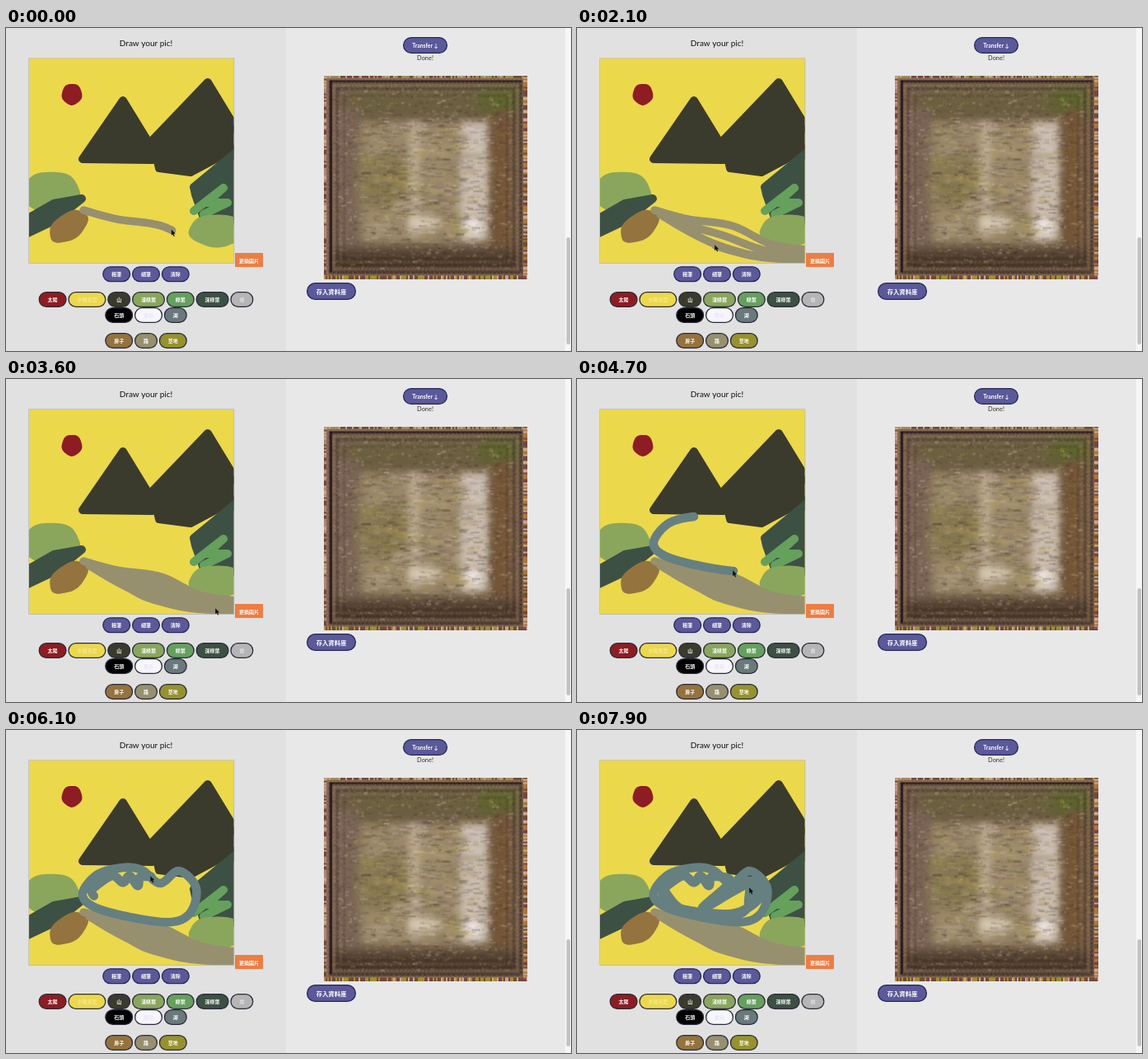
These frames come from a looping animation (686x392 px, 8 s). An HTML page with a canvas:

```html
<!DOCTYPE html>
<html lang="zh-Hant">
<head>
<meta charset="utf-8">
<title>Draw your pic!</title>
<style>
html, body { margin: 0; width: 100%; height: 100%; overflow: hidden; background: #e1e1e2; }
canvas { display: block; width: 686px; height: 392px; }
</style>
</head>
<body>
<canvas id="stage"></canvas>
<script>
const W = 686, H = 392, LOOP = 8000, STEP = 100;
const ratio = window.devicePixelRatio || 1;
const CJK = '"Noto Sans CJK TC", "Noto Sans CJK", sans-serif';
const LATIN = 'Lato, "Open Sans", sans-serif';
const C = {
  sky: '#ecd84b', sun: '#8e1c23', hill: '#3a3b2d', light: '#8aa65d', leaf: '#65a05d',
  dark: '#3d5044', house: '#94733f', road: '#97906f', lake: '#667f80', grass: '#97922f',
  pen: '#5b5999', navy: '#26265c', rim: '#2b2b3a'
};

function setup(canvas, w, h) {
  canvas.width = w * ratio;
  canvas.height = h * ratio;
  const g = canvas.getContext('2d');
  g.scale(ratio, ratio);
  return g;
}

function seeded(seed) {
  return () => (seed = (seed * 1664525 + 1013904223) >>> 0) / 4294967296;
}

// ---- interface ----
function label(g, text, x, y, font, color) {
  g.font = font;
  g.fillStyle = color;
  g.textAlign = 'center';
  g.textBaseline = 'middle';
  g.fillText(text, x, y);
}

function pill(g, cx, cy, w, h, text, fill, rim, font, ink = '#fff') {
  g.beginPath();
  g.roundRect(cx - w / 2 + .6, cy - h / 2 + .6, w - 1.2, h - 1.2, h / 2);
  g.fillStyle = fill;
  g.fill();
  g.lineWidth = 1.3;
  g.strokeStyle = rim;
  g.stroke();
  label(g, text, cx, cy + .5, font, ink);
}

// A centred row of buttons, each as wide as its text plus padding
function buttonRow(g, cy, rim, items) {
  const gap = 1.8, width = text => 22 + 6 * text.length;
  let x = 170 - items.reduce((sum, [text]) => sum + width(text) + gap, -gap) / 2;
  for (const [text, fill, ink] of items) {
    const w = width(text);
    pill(g, x + w / 2, cy, w, 19, text, fill, rim, `bold 6px ${CJK}`, ink);
    x += w + gap;
  }
}

function drawPage(g) {
  const box = (x, y, w, h, color) => { g.fillStyle = color; g.fillRect(x, y, w, h); };
  box(0, 0, 340, H, '#e1e1e2');
  box(340, 0, 339, H, '#e8e8e8');
  box(679, 0, 7, H, '#f6f6f6');
  g.fillStyle = '#c2c2c2';
  g.beginPath();
  g.roundRect(680.5, 254, 4.5, 130, 2.2);
  g.fill();

  label(g, 'Draw your pic!', 170, 19, `10px ${LATIN}`, '#111');
  label(g, 'Done!', 509, 36.5, `7.4px ${LATIN}`, '#333');
  pill(g, 509, 21, 54, 20, 'Transfer ↓', C.pen, C.navy, `bold 6.8px ${LATIN}`);
  pill(g, 395, 319.5, 60, 21, '存入資料庫', C.pen, C.navy, `bold 7.3px ${CJK}`);
  box(278, 273, 34, 17, '#ee7d43');
  label(g, '更換圖片', 295, 283, `bold 6px ${CJK}`, '#fff');

  buttonRow(g, 298.7, C.navy, [['粗筆', C.pen], ['細筆', C.pen], ['清除', C.pen]]);
  buttonRow(g, 329.5, C.rim, [
    ['太陽', C.sun], ['夕陽天空', C.sky, '#f4e99c'], ['山', C.hill], ['淺綠葉', C.light],
    ['綠葉', C.leaf], ['深綠葉', C.dark], ['霧', '#b5b5b5', '#dedede']
  ]);
  buttonRow(g, 348.5, C.rim, [['石頭', '#000'], ['雲朵', '#f7f5fd', '#e8e6f0'], ['湖', '#6a797c']]);
  buttonRow(g, 379.5, C.rim, [['房子', C.house], ['路', C.road], ['草地', C.grass]]);
}

// ---- generated picture on the right ----
function drawTexture(g) {
  const S = 247, art = document.createElement('canvas'), a = setup(art, S, S);
  const rnd = seeded(71);
  const pick = list => list[Math.floor(rnd() * list.length)];
  const patch = (x, y, w, h, color, blur = 6) => {
    a.filter = `blur(${blur * ratio}px)`;
    a.fillStyle = color;
    a.fillRect(x, y, w, h);
    a.filter = 'none';
  };

  a.fillStyle = '#6f5a48';
  a.fillRect(0, 0, S, S);
  patch(30, 14, 205, 36, '#6b6040', 8);
  patch(190, 16, 44, 26, '#5c642c', 8);
  patch(14, 40, 30, 170, '#7a6456');
  patch(44, 56, 156, 148, '#9c8a6c');
  patch(46, 96, 56, 64, '#877950', 9);
  patch(103, 56, 14, 140, '#b8a890', 4);
  patch(166, 57, 34, 142, '#cabdb2', 4);
  patch(172, 172, 18, 22, '#ece4e0', 5);
  patch(104, 172, 34, 14, '#d8ccb8', 5);
  patch(204, 44, 24, 165, '#745637');
  patch(12, 213, 224, 24, '#4c3a2b');

  // cloudy blotches, then horizontal brush-like streaks
  for (let i = 0; i < 90; i++) {
    a.globalAlpha = .25;
    patch(44 + rnd() * 145, 54 + rnd() * 140, 8 + rnd() * 20, 2 + rnd() * 6,
      pick(['#6d6038', '#c4ad62', '#cfbdb0', '#7c5f5c']), 2.5);
  }
  for (let i = 0; i < 2600; i++) {
    const x = 8 + rnd() * 226, y = 10 + rnd() * 224;
    const inner = x > 40 && x < 200 && y > 50 && y < 205;
    a.globalAlpha = .06 + rnd() * .2;
    a.fillStyle = pick(['#33241e', '#e4d6c6', '#b5a04a', '#6b4650', '#565c30']);
    a.fillRect(x, y, 2 + rnd() * (inner ? 10 : 4), 1 + rnd() * 2);
  }

  // nested frame: alternating dark and pale rings, broken into stitches
  for (let d = 3; d < 30; d++) {
    const wave = Math.cos((d - 8) * .75), fade = Math.exp(-d / 14);
    a.globalAlpha = Math.abs(wave) * fade;
    a.strokeStyle = wave > 0 ? '#22121a' : '#a88a68';
    a.setLineDash([2 + rnd() * 3, 1 + rnd() * 1.5]);
    a.strokeRect(d, d, S - 2 * d, S - 2 * d);
  }
  a.setLineDash([]);
  a.globalAlpha = .75;
  a.fillStyle = '#25121b';
  a.fillRect(7, 6, 3, S - 14);
  a.fillRect(7, 6, S - 14, 2);

  // speckled rim, one tint per side
  const rim = (tint, place) => {
    for (let p = 0; p < S; p += 2) {
      a.globalAlpha = .8;
      a.fillStyle = pick([tint, tint, '#7d3846', '#dcb8a0', '#6b4b2c']);
      a.fillRect(...place(p));
    }
  };
  rim('#b39a5c', p => [p, 0, 2, 3]);
  rim('#c08f86', p => [0, p, 3, 2]);
  rim('#b97c34', p => [S - 5, p, 5, 2]);
  rim('#aa9a2c', p => [p, S - 4, 2, 4]);
  g.drawImage(art, 386, 57.5, S, S);
}

// ---- finished part of the drawing ----
function clipPaper(g) {
  g.beginPath();
  g.rect(28, 37, 248.5, 248);
  g.clip();
}

// Area outlined and filled with the round pen
function scrawl(g, color, pts, fill = true) {
  g.beginPath();
  pts.forEach(p => g.lineTo(...p));
  g.fillStyle = g.strokeStyle = color;
  g.lineWidth = 10;
  g.lineCap = g.lineJoin = 'round';
  if (fill) { g.closePath(); g.fill(); }
  g.stroke();
}

// Slightly uneven ellipse
function blob(g, color, x, y, rx, ry, tilt = 0) {
  g.save();
  g.translate(x, y);
  g.rotate(tilt);
  g.beginPath();
  for (let a = 0; a < 6.28; a += .1) {
    const k = 1 + .03 * Math.sin(a * 5);
    g.lineTo(Math.cos(a) * rx * k, Math.sin(a) * ry * k);
  }
  g.fillStyle = color;
  g.fill();
  g.restore();
}

function drawScene(g) {
  g.fillStyle = '#b5b5ad';
  g.fillRect(27.4, 36.4, 249.8, 249.4);
  g.save();
  clipPaper(g);
  g.fillStyle = C.sky;
  g.fillRect(28, 37, 249, 248);
  blob(g, C.sun, 80, 80.5, 12.3, 13);
  scrawl(g, C.hill, [[142, 88], [93, 159], [178, 160], [172, 137]]);
  scrawl(g, C.hill, [[245, 66], [178, 136], [186, 170], [224, 175], [290, 140]]);
  scrawl(g, C.dark, [[290, 142], [228, 193], [230, 202], [240, 230], [290, 235]]);
  scrawl(g, C.leaf, [[228, 222], [264, 194], [244, 212], [269, 212], [240, 226]], false);
  blob(g, C.light, 256, 246, 34, 20);
  blob(g, C.light, 55, 200, 35, 26);
  scrawl(g, C.dark, [[20, 235], [58, 213], [92, 207], [58, 234], [20, 252]]);
  blob(g, C.house, 76, 241, 26, 16, -.6);
  g.restore();
}

// ---- pen movement ----
// Smooth curve through points; u counts points, wrapping when the curve is a ring
function curve(pts, u, ring = false) {
  const n = pts.length, i = Math.floor(u), f = u - i;
  const at = k => pts[ring ? (k + n) % n : Math.max(0, Math.min(n - 1, k))];
  const q = [at(i - 1), at(i), at(i + 1), at(i + 2)];
  return [0, 1].map(d => {
    const [a, b, c, e] = q.map(p => p[d]);
    return b + f / 2 * (c - a + f * (2 * a - 5 * b + 4 * c - e + f * (3 * (b - c) + e - a)));
  });
}

const mix = (a, b, k) => a.map((v, i) => v + (b[i] - v) * k);

// Values at time t from rows of [time, ...values]
function keyed(rows, t) {
  const i = Math.max(1, rows.findIndex(r => r[0] >= t));
  const [a, b] = [rows[i - 1], rows[i]];
  return mix(a, b, (t - a[0]) / (b[0] - a[0])).slice(1);
}

// Road: sweeps of u along it, v from the upper edge (0) to the lower (1)
const upper = [[94, 221], [135, 232], [188, 240], [235, 262], [280, 269]];
const lower = [[97, 224], [130, 245], [168, 264], [222, 278], [280, 281]];
const sweeps = [
  [-900, 0, 0], [0, .57, 0], [600, 1, 0], [800, 1, .5], [1400, .1, .5], [1500, .05, .9], [1950, 1, 1],
  [2100, .5, 1], [2500, .1, .75], [2900, .9, .75], [3100, .1, .25], [3400, .95, .25], [3600, .87, 1]
];
function roadAt(t) {
  const [u, v] = keyed(sweeps, t);
  return mix(curve(upper, u * 4), curve(lower, u * 4), v);
}

// Lake: one turn around the shore, curling inwards at the end
const shore = [[142, 167], [110, 176], [93, 201], [118, 219], [190, 233],
  [222, 224], [231, 192], [210, 171], [187, 186], [165, 170]];
function shoreAt(t) {
  const [u, r] = keyed([[4100, 0, 1], [4700, 4, 1], [5200, 10, 1], [5320, 11.3, .95], [5400, 12, .8]], t);
  return mix([162, 203], curve(shore, u, true), r);
}

const through = (from, to, pts) => t => curve(pts, (t - from) / (to - from) * (pts.length - 1));
const stroke = (from, to, color, width, at) => ({ from, to, color, width, at });
const path = (from, to, color, pts) => stroke(from, to, color, 11, through(from, to, pts));

const strokes = [
  stroke(-900, 3600, C.road, 9.5, roadAt),
  path(3600, 4100, null, [[255, 279], [206, 349], [142, 167]]),
  stroke(4100, 5400, C.lake, 10.5, shoreAt),
  path(5400, 5500, null, [[107, 201], [120, 189]]),
  path(5500, 6800, C.lake, [[112, 186], [103, 194], [128, 177], [142, 185], [150, 177], [160, 189], [164, 178],
    [186, 184], [152, 217], [210, 186], [222, 203], [188, 223], [122, 216], [104, 200], [114, 210]]),
  path(6800, 7900, C.lake, [[114, 210], [104, 192], [126, 217], [168, 223], [200, 222], [215, 198],
    [204, 184], [222, 188], [209, 212], [210, 192]])
];

function drawStroke(g, s, t) {
  const end = Math.min(t, s.to);
  if (s.color) {
    g.beginPath();
    for (let k = s.from; k < end; k += 10) g.lineTo(...s.at(k));
    g.lineTo(...s.at(end));
    g.strokeStyle = s.color;
    g.lineWidth = s.width;
    g.lineCap = g.lineJoin = 'round';
    g.stroke();
  }
  return s.at(end);
}

function drawCursor(g, [x, y]) {
  g.save();
  g.translate(x - .8, y - .8);
  g.beginPath();
  [[0, 0], [0, 7], [1.6, 5.5], [2.8, 8.2], [4, 7.7], [2.8, 5], [5, 5]].forEach(p => g.lineTo(...p));
  g.closePath();
  g.fillStyle = '#111';
  g.fill();
  g.restore();
}

const base = document.createElement('canvas');
const bg = setup(base, W, H);
drawPage(bg);
drawTexture(bg);
drawScene(bg);
const ctx = setup(document.getElementById('stage'), W, H);

function render(t) {
  ctx.drawImage(base, 0, 0, W, H);
  ctx.save();
  clipPaper(ctx);
  let tip;
  for (const s of strokes) if (t >= s.from) tip = drawStroke(ctx, s, t);
  ctx.restore();
  drawCursor(ctx, tip);
}

const begin = performance.now();
function tick() {
  const t = (performance.now() - begin) % LOOP;
  render(Math.floor(t / STEP) * STEP);
  requestAnimationFrame(tick);
}
tick();
</script>
</body>
</html>
```
